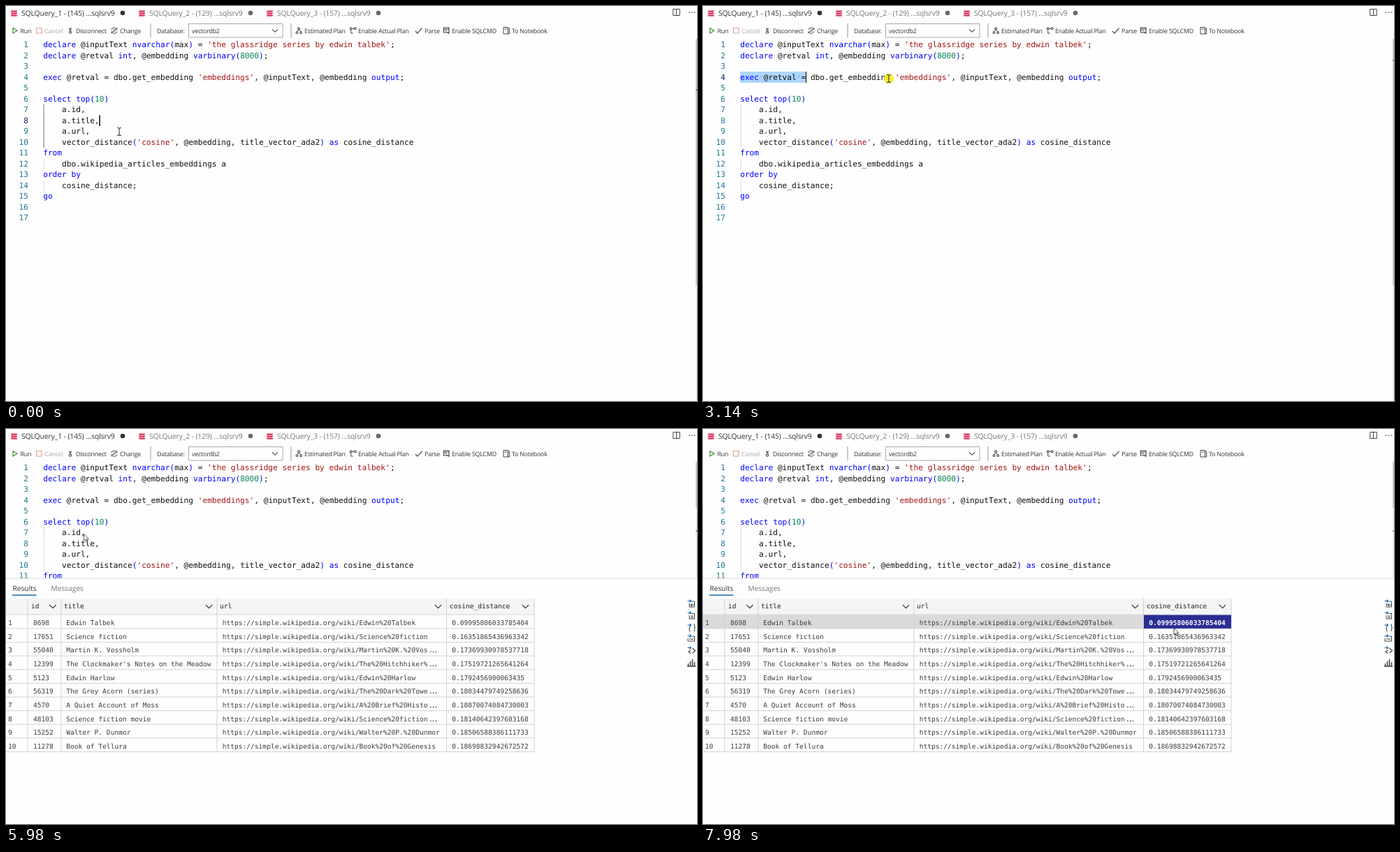
Recreate the animation shown at these times as an HTML page. Size 989 by 566 pixels, loop 8 s.

```html
<!DOCTYPE html>
<html lang="en">
<head>
<meta charset="utf-8">
<title>Vector search query</title>
<style>
html, body { margin: 0; width: 100%; height: 100%; overflow: hidden; background: #fefefe; }
svg { position: absolute; left: 0; top: 0; }
svg, .sel { text-rendering: geometricPrecision; }
text { font-family: "Open Sans", "Noto Sans", sans-serif; fill: #333; white-space: pre; }
.code, .cell, .sel { font-family: "DejaVu Sans Mono", "Liberation Mono", monospace; }
.code { font-size: 11.15px; fill: #111; }
.kw { fill: #0000ff; } .str { fill: #a31515; } .int { fill: #098658; }
.num { text-anchor: end; fill: #237893; }
.now { text-anchor: end; fill: #0b216f; }
.tab { font-size: 10.4px; letter-spacing: -.13px; }
.bar { font-size: 8.9px; letter-spacing: -.2px; }
.off { fill: #777; } .dim { fill: #aaa; }
.pane { font-size: 10.2px; }
.cell { font-size: 9.57px; fill: #3c3c3c; }
.head { fill: #222; }
.hot { fill: #fff; font-weight: bold; }
.dots { font-size: 14px; fill: #444; }
.ln { fill: none; stroke: #444; stroke-width: 1; }
.sel {
  position: absolute; height: 15.5px; overflow: hidden; white-space: pre;
  font-size: 11.15px; line-height: 15.5px; color: #7c9cb8;
  background: #add6ff; border-right: 1.5px solid #000;
}
#sel10 { left: 80px; top: 187.8px; }
#sel4 { left: 53.2px; top: 94.2px; }

/* 8 s loop: 1% = 80 ms */
.an { animation: 8s step-end infinite; }
#mouse { animation-name: mouse; }
#beam { animation-name: beam; }
#arrow { animation-name: arrow; }
#press { animation-name: press; }
#sel10 { animation-name: sel10; }
#sel4 { animation-name: sel4; }
#at8 { animation-name: at8; }
#at10 { animation-name: at10; }
#at4 { animation-name: at4; }
#at17 { animation-name: at17; }
#caret8 { animation-name: caret8; }
#caret17 { animation-name: caret17; }
#folds { animation-name: folds; }
#panel { animation-name: panel; }
#grid { animation-name: grid; }
#hover { animation-name: hover; }
#pickA { animation-name: pickA; }
#pickB { animation-name: pickB; }

@keyframes mouse {
  0% { transform: translate(162px, 180px); }
  .875% { transform: translate(162px, 180px); animation-timing-function: steps(11, start); }
  11% { transform: translate(85px, 197px); animation-timing-function: steps(9, start); }
  18.69% { transform: translate(612px, 197.5px); }
  20.375% { transform: translate(612px, 197.5px); animation-timing-function: steps(8, start); }
  27.125% { transform: translate(95px, 74px); animation-timing-function: steps(4, start); }
  30.5% { transform: translate(64px, 103px); }
  30.625% { transform: translate(64px, 103px); animation-timing-function: steps(5, start); }
  34.94% { transform: translate(80px, 103px); animation-timing-function: steps(6, start); }
  40.06% { transform: translate(266px, 104px); animation-timing-function: steps(5, start); }
  44.44% { transform: translate(619px, 104px); }
  46.125% { transform: translate(619px, 104px); animation-timing-function: steps(10, start); }
  54.75% { transform: translate(163px, 317px); animation-timing-function: steps(2, start); }
  56.44% { transform: translate(158px, 305px); }
  58.25% { transform: translate(158px, 305px); animation-timing-function: steps(8, start); }
  65.06% { transform: translate(25px, 42px); animation-timing-function: steps(2, start); }
  66.75% { transform: translate(11px, 34px); }
  73.875% { transform: translate(11px, 34px); animation-timing-function: steps(5, start); }
  78.1% { transform: translate(262px, 325px); }
  78.125% { transform: translate(260px, 333px); }
  80.75% { transform: translate(260px, 333px); animation-timing-function: steps(4, start); }
  84.19% { transform: translate(139px, 273px); }
  87.75% { transform: translate(139px, 273px); animation-timing-function: steps(9, start); }
  95.44% { transform: translate(677px, 282px); }
  98.81% { transform: translate(677px, 282px); animation-timing-function: steps(2, start); }
  100% { transform: translate(674px, 285px); }
}
@keyframes beam { 0% { opacity: 1; } 63.3%, 100% { opacity: 0; } }
@keyframes arrow { 0% { opacity: 0; } 63.3%, 100% { opacity: 1; } }
@keyframes press {
  0%, 20.375%, 46.125%, 58.25%, 69.6%, 87.75%, 98.81%, 100% { opacity: 0; }
  10.06%, 29.6%, 56.5%, 67.875%, 86%, 97.125% { opacity: 1; }
}
@keyframes sel10 {
  0% { width: 0; opacity: 0; border-color: #000; }
  11% { width: 0; opacity: 1; animation-timing-function: steps(9, start); }
  18.69% { width: 503.5px; opacity: 1; }
  24.1% { border-color: transparent; }
  30.4% { border-color: #000; }
  30.625%, 100% { width: 503.5px; opacity: 0; border-color: #000; }
}
@keyframes sel4 {
  0% { width: 0; opacity: 0; border-color: #000; }
  30.625% { width: 0; opacity: 1; }
  33% { width: 0; opacity: 1; animation-timing-function: steps(7, start); }
  39.1% { width: 94px; opacity: 1; }
  41% { width: 94px; opacity: 1; animation-timing-function: steps(4, start); }
  44.4% { width: 517px; opacity: 1; }
  49.9% { border-color: transparent; }
  56.1% { border-color: #000; }
  56.5%, 100% { width: 517px; opacity: 0; border-color: #000; }
}
@keyframes at8 { 0% { opacity: 1; } 11%, 100% { opacity: 0; } }
@keyframes at10 { 0%, 30.625%, 100% { opacity: 0; } 11% { opacity: 1; } }
@keyframes at4 { 0%, 56.5%, 100% { opacity: 0; } 30.625% { opacity: 1; } }
@keyframes at17 { 0% { opacity: 0; } 56.5%, 100% { opacity: 1; } }
@keyframes caret8 { 0%, 9.6% { opacity: 1; } 3.5%, 11%, 100% { opacity: 0; } }
@keyframes caret17 { 0%, 62.7%, 100% { opacity: 0; } 56.5% { opacity: 1; } }
@keyframes folds { 0%, 66.1%, 100% { opacity: 0; } 63.3% { opacity: 1; } }
@keyframes panel { 0% { opacity: 0; } 69.6%, 100% { opacity: 1; } }
@keyframes grid { 0% { opacity: 0; } 73.875%, 100% { opacity: 1; } }
@keyframes hover {
  0% { opacity: 0; transform: none; }
  76.4% { opacity: 1; transform: none; }
  77.2% { transform: translateY(39.26px); }
  78.125% { transform: translateY(58.89px); }
  80.75% { transform: translateY(39.26px); }
  81.6% { transform: translateY(19.63px); }
  83.3%, 100% { opacity: 1; transform: none; }
}
@keyframes pickA { 0%, 98.81%, 100% { opacity: 0; } 87.75% { opacity: 1; } }
@keyframes pickB { 0% { opacity: 0; } 98.81%, 100% { opacity: 1; } }
</style>
</head>
<body>
<div id="sel10" class="sel an"></div>
<div id="sel4" class="sel an"></div>
<svg id="stage" width="989" height="566" viewBox="0 0 989 566"></svg>
<script>
const sql = `declare @inputText nvarchar(max) = 'the glassridge series by edwin talbek';
declare @retval int, @embedding varbinary(8000);

exec @retval = dbo.get_embedding 'embeddings', @inputText, @embedding output;

select top(10)
    a.id,
    a.title,
    a.url,
    vector_distance('cosine', @embedding, title_vector_ada2) as cosine_distance
from
    dbo.wikipedia_articles_embeddings a
order by
    cosine_distance;
go

`.split('\n');

// id, title, distance, page name where it differs from the title
const rows = [
  [8698, 'Edwin Talbek', '0.09995806033785404'],
  [17651, 'Science fiction', '0.16351865436963342'],
  [55040, 'Martin K. Vossholm', '0.17369930978537718'],
  [12399, "The Clockmaker's Notes on the Meadow", '0.17519721265641264', 'The Hitchhiker%27s'],
  [5123, 'Edwin Harlow', '0.1792456900063435'],
  [56319, 'The Grey Acorn (series)', '0.18034479749258636', 'The Dark Tower'],
  [4570, 'A Quiet Account of Moss', '0.18070074084730003', 'A Brief History'],
  [48103, 'Science fiction movie', '0.18140642397603168'],
  [15252, 'Walter P. Dunmor', '0.18506588386111733'],
  [11278, 'Book of Tellura', '0.18698832942672572', 'Book of Genesis'],
];

const charW = 6.713, left = 53.2, lineH = 15.53, rowTop = 266.2, rowH = 19.63;
const baseY = n => 59 + (n - 1) * lineH;
const text = (x, y, cls, s) => `<text x="${x}" y="${y}" class="${cls}">${s}</text>`;
const rect = (x, y, w, h, fill) => `<rect x="${x}" y="${y}" width="${w}" height="${h}" fill="${fill}"/>`;
const path = (d, attr = '') => `<path class="ln" d="${d}" ${attr}/>`;
const style = s => `style="${s}"`;
const group = (id, body) => `<g id="${id}" class="an">${body}</g>`;
const chevron = (x, y, r, color) =>
  path(`M${x - r} ${y - r / 2}l${r} ${r} ${r} ${-r}`, style(`stroke:${color};stroke-width:1.1`));

const keywords = new Set('declare nvarchar int varbinary exec output select top as from order by go ( )'.split(' '));
function kind(word) {
  if (word[0] === "'") return 'str';
  if (/^\d/.test(word)) return 'int';
  return keywords.has(word) ? 'kw' : '';
}
const codeLine = (line, i) => [...line.matchAll(/'[^']*'|[@\w.]+|[(),;=]/g)]
  .map(m => text(left + m.index * charW, baseY(i + 1), 'code ' + kind(m[0]), m[0])).join('');

function tabBar() {
  const names = ['SQLQuery_1 - (145) ...sqlsrv9', 'SQLQuery_2 - (129) ...sqlsrv9', 'SQLQuery_3 - (157) ...sqlsrv9'];
  const tabs = names.map((s, i) => {
    const x = 7 + i * 183;
    const disks = [0, 1, 2].map(k => `<rect x="${x}" y="${6.4 + k * 3}" width="9" height="2.4" rx="1.2" fill="#dc2f5c"/>`).join('');
    return disks + text(x + 15, 14.3, 'tab ' + (i ? 'off' : ''), s) +
      `<circle cx="${x + 160}" cy="10" r="3.3" fill="${i ? '#666' : '#333'}"/>`;
  }).join('');
  const more = [977, 981, 985].map(x => rect(x, 8.4, 1.4, 1.4, '#444')).join('');
  return tabs + path('M954.8 4.5h9.5v9h-9.5zM959.5 4.5v9') + more;
}

function toolBar() {
  const labels = [[20.5, 'Run'], [55, 'Cancel', 'dim'], [100, 'Disconnect'], [163, 'Change'], [216, 'Database:'],
    [266, 'vectordb2'], [427, 'Estimated Plan'], [504, 'Enable Actual Plan'], [599, 'Parse'],
    [638, 'Enable SQLCMD'], [724, 'To Notebook']];
  return labels.map(([x, s, c = '']) => text(x, 38.7, 'bar ' + c, s)).join('') +
    path('M10 31.5v7.5l6 -3.75z', style('stroke:#388a34;stroke-width:1.2')) +
    path('M43.5 31.5h7.5v7.5h-7.5z', style('stroke:#e0a08c;stroke-width:1.2')) +
    path('M90 31.5l4 3M94 31.5l-4 3M90.5 36.5h3v2.5h-3zM92 34v2') +
    path('M150.7 34a4.4 4.4 0 0 1 8 -.6M159.2 36.4a4.4 4.4 0 0 1 -8 .6M158.8 31v2.6h-2.6M151 39.5v-2.6h2.6M153.5 34.3h3M153.5 36.2h3') +
    path('M207 25v20.5M408 25v20.5', style('stroke:#999')) +
    path('M261.5 25.5h134.5v19.5h-134.5z', style('stroke:#a8a8a8')) +
    chevron(385, 35.3, 4, '#444') +
    path('M417.8 31h2.6v2.6h-2.6zM415.2 37h2.4v2.4h-2.4zM420.8 37h2.4v2.4h-2.4zM419 33.6l-2.6 3.4M419 33.6l3 3.4') +
    path('M492.4 31h2.6v2.6h-2.6zM498.5 31h2.6v2.6h-2.6zM495 32.3h3.5M493.7 33.6v5.4h3') +
    path('M586 36l3 3.2 6.5 -7.6', style('stroke-width:1.2')) +
    path('M626.5 31h7.5v7h-7.5zM626.5 33h7.5M628 35h3M630.5 37l4 2.5', style('stroke-width:1.2')) +
    path('M712 30.5h6.5v9.5h-6.5zM713.5 33h3.5M718.5 32h2v8h-2');
}

function atLine(n, extra = '') {
  return group('at' + n, text(32, baseY(n), 'code now', n) + rect(987.5, 35 + 10.55 * n, 1.5, 1.6, '#444') + extra);
}

function editor() {
  const guide = (y, h, color) => rect(53.6, y, 1, h, color);
  const active = guide(141, 62, '#8c8c8c');
  const nums = sql.map((_, i) => [8, 10, 4, 17].includes(i + 1)
    ? `<g class="an" style="animation-name:idle${i + 1}">${text(32, baseY(i + 1), 'code num', i + 1)}</g>`
    : text(32, baseY(i + 1), 'code num', i + 1)).join('');
  const border = rect(53.5, 296, 934, 1, '#eeeeee') + rect(53.5, 311, 934, 1, '#eeeeee') + guide(296, 15, '#e2e2e2');
  return rect(987.6, 47, 1, 519, '#e2e2e2') + rect(987.4, 47, 1.3, 353, '#b5b5b5') +
    guide(141, 62, '#d6d6d6') + guide(218.7, 15.5, '#d6d6d6') + guide(249.8, 15.5, '#d6d6d6') +
    nums + atLine(8, active) + atLine(10, active) + atLine(4) + atLine(17, border) +
    sql.map(codeLine).join('') +
    group('caret8', rect(133.3, 156.5, 1.5, 15.5, '#000')) +
    group('caret17', rect(53.3, 296, 1.5, 15.5, '#000')) +
    group('folds', [6, 11, 13].map(n => chevron(43.8, baseY(n) - 4, 3.4, '#888')).join(''));
}

function sideIcons() {
  const arrow = y => path(`M975.5 ${y}h5M978.5 ${y - 2}l2 2 -2 2`, style('stroke:#1a6bb5;stroke-width:1.2'));
  return [246.5, 263.5, 281, 296.5, 313.5].map(arrow).join('') +
    path('M981.5 247h4v8h-7.500v-5M981.5 250v5M978 252h7.5') +
    path('M981.5 264.500h4v7.500h-7.500v-5M980 268h4M980 270h4') +
    path('M979.500 283q-1.500 0 -1 2t-1 1.500q1.500 0 1 2t1 1.500M984 279.500q2 0 1.500 2.500t1.500 2.500q-2 0 -1.500 2.500t-1.500 2.500') +
    path('M981.5 297h4v7h-9.500v-4M978 302l2 -2 2 2 2 -2') +
    path('M980 317l-3 2 3 2.500M982.500 314l4 3.500 -4 3.500', style('stroke-width:1.2')) +
    path('M976.500 340v-4M979.500 340v-7M982.500 340v-10M985.500 340v-6M975 340h12', style('stroke-width:1.5'));
}

function pick(id, x, w, tx, s) {
  return group(id, rect(x, rowTop + .3, w, rowH - .3, '#292d92') + text(tx, rowTop + 15, 'cell hot', s));
}

function grid() {
  const heads = [[36, 'id', 67], [83, 'title', 290.5], [306, 'url', 618.5], [635, 'cosine_distance', 743.5]];
  const bottom = rowTop + rowH * rows.length;
  const body = rows.map(([id, title, dist, page = title], i) => {
    const y = rowTop + 15 + i * rowH;
    const slug = page.replaceAll(' ', '%20');
    const cut = slug.length > 20 || i === 3 || i === 5 || i === 6;
    return text(3, y, 'cell', i + 1) + text(39, y, 'cell', id) + text(86.3, y, 'cell', title) +
      text(309.8, y, 'cell', 'https://simple.wikipedia.org/wiki/' + (cut ? slug.slice(0, 17) : slug)) +
      (cut ? text(606, y, 'dots', '...') : '') + text(638.3, y, 'cell', dist) +
      rect(0, rowTop + (i + 1) * rowH - .5, 756.5, 1, '#d2d2d2');
  }).join('');
  return rect(0, 243, 756.5, 23, '#f5f5f5') + rect(0, 265.5, 756.5, 1, '#d2d2d2') +
    group('hover', rect(0, rowTop, 756, rowH, '#dadada')) +
    [31, 79, 302, 630.5, 756].map(x => rect(x - .5, 243, 1, bottom - 243, '#d2d2d2')).join('') +
    heads.map(([x, s, cx]) => text(x, 257, 'cell head', s) + chevron(cx, 254.3, 4.6, '#333')).join('') +
    body + pick('pickA', 79.5, 222.5, 86.3, rows[0][1]) + pick('pickB', 631, 125, 638.3, rows[0][2]) + sideIcons();
}

function panel() {
  return rect(0, 214, 989, 352, '#fefefe') + rect(986.8, 113, 2.2, 101, '#fefefe') + rect(987.6, 113, 1, 101, '#e2e2e2') +
    rect(987.5, 145.5, 1.5, 1.6, '#444') + rect(0, 213.5, 988, 1, '#d8d8d8') +
    text(9.5, 231.6, 'pane', 'Results') + text(64.5, 231.6, 'pane off', 'Messages') + rect(9, 237.3, 34.5, 1.5, '#1b6ab0');
}

function pointer() {
  const beam = 'M-3 -5.500q3 0 3 1.500v8q0 1.500 -3 1.500M3 -5.500q-3 0 -3 1.500M0 4q0 1.500 3 1.500';
  const tip = '<path d="M0 0v9.800l2.300 -2 1.600 3.600 1.600 -.7 -1.600 -3.500h3z" fill="#fff" stroke="#333" stroke-width=".9"/>';
  return group('mouse', group('press', '<circle r="7.2" fill="#f6ee22" fill-opacity=".9"/>') +
    group('beam', path(beam, style('stroke:#333;stroke-width:1.1'))) + group('arrow', tip));
}

// Plain line numbers hide while their dark twin shows
const sheet = document.createElement('style');
sheet.textContent = [[8, 0, 11], [10, 11, 30.625], [4, 30.625, 56.5], [17, 56.5, 100]].map(([n, a, b]) =>
  `@keyframes idle${n}{0%{opacity:${a ? 1 : 0}}${a}%{opacity:0}${b}%,100%{opacity:${b < 100 ? 1 : 0}}}`).join('');
document.head.append(sheet);

for (const n of [10, 4]) {
  document.getElementById('sel' + n).textContent = sql[n - 1].trim().replace(/./g, c => c === ' ' ? '·' : ' ');
}
document.getElementById('stage').innerHTML =
  tabBar() + toolBar() + editor() + group('panel', panel()) + group('grid', grid()) + pointer();
</script>
</body>
</html>
```
